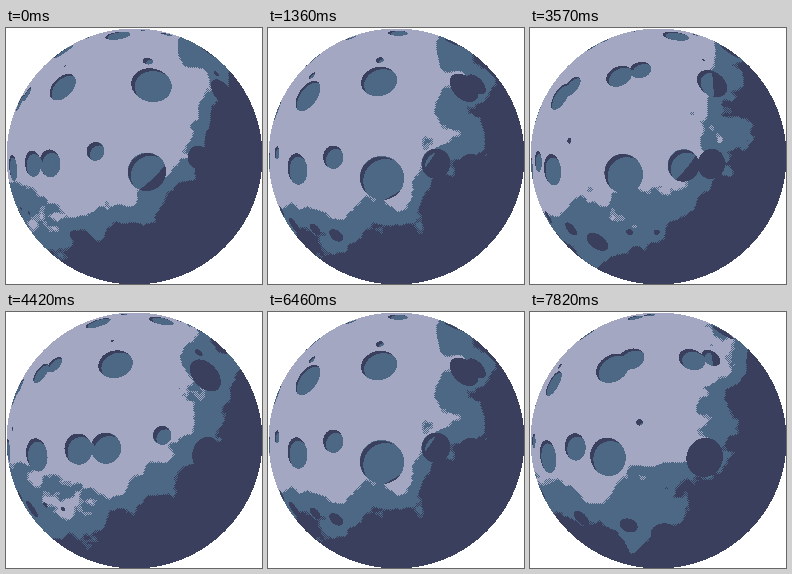
Recreate the animation shown at these times as an HTML page with a canvas. Size 256 by 256 pixels, loop 7.99 s.

```html
<!DOCTYPE html>
<html lang="en">
<head>
<meta charset="utf-8">
<title>Rotating moon</title>
<style>
  html, body { margin: 0; width: 100%; height: 100%; overflow: hidden; background: #fff; }
  canvas { display: block; width: 100%; height: 100%; image-rendering: pixelated; }
</style>
</head>
<body>
<canvas id="moon" width="256" height="256"></canvas>
<script>
const SIZE = 256;
const STEP_MS = 170;
const LOOP_STEPS = 47;
const TURN_STEPS = 30;
const SEED = 5.08;
const LIGHT = 0.25;
const GROUND_CELLS = 8;
const CRATER_CELLS = 5;
const MID_BORDER = 0.615;
const DARK_BORDER = 0.729;
const CRATER_BORDER = 0.465;
const DITHER = 2 / SIZE;
const SHADE_OFFSET = (LIGHT - 0.5) * 0.03;

// Little-endian ABGR pixels
const pack = (r, g, b) => (255 << 24 | b << 16 | g << 8 | r) >>> 0;
const PALE = pack(0xa3, 0xa7, 0xc2);
const MID = pack(0x4c, 0x68, 0x85);
const DARK = pack(0x3a, 0x3f, 0x5e);

const fract = v => v - Math.floor(v);
const ease = v => v * v * (3 - 2 * v);
const mix = (a, b, t) => a + (b - a) * t;

// Tiling lattice of seeded random values
function lattice(cells) {
  const values = Array.from({ length: cells * cells }, (_, n) => {
    const x = n % cells, y = Math.floor(n / cells);
    return fract(Math.sin(x * 12.9898 + y * 78.233) * 15.5453 * SEED);
  });
  const wrap = v => ((v % cells) + cells) % cells;
  return (x, y) => values[wrap(y) * cells + wrap(x)];
}
const groundRand = lattice(GROUND_CELLS);
const craterRand = lattice(CRATER_CELLS);

function noise(x, y) {
  const ix = Math.floor(x), iy = Math.floor(y);
  const tx = ease(x - ix), ty = ease(y - iy);
  const top = mix(groundRand(ix, iy), groundRand(ix + 1, iy), tx);
  const bottom = mix(groundRand(ix, iy + 1), groundRand(ix + 1, iy + 1), tx);
  return mix(top, bottom, ty);
}

function fbm(x, y) {
  let value = 0;
  for (let octave = 0, scale = 0.5; octave < 4; octave++, scale /= 2) {
    value += noise(x, y) * scale;
    x *= 2;
    y *= 2;
  }
  return value;
}

// 0 inside a crater, 1 outside
function circleNoise(x, y) {
  const row = Math.floor(y);
  x += row * 0.31;
  const column = Math.floor(x);
  const h = craterRand(column, row);
  const middle = 0.25 + h * 0.5;
  const distance = Math.hypot(x - column - middle, y - row - middle);
  const radius = h * 0.25;
  if (distance >= radius) return 1;
  return ease(Math.max(0, (distance - 0.9 * radius) / (0.1 * radius)));
}

function crater(u, v, turn) {
  const x = (u + turn) * CRATER_CELLS, y = v * CRATER_CELLS;
  return 1 - circleNoise(x + 11, y + 11) * circleNoise(x + 12, y + 12);
}

// Everything about a point on the disc that does not change with time
const points = [];
for (let row = 0; row < SIZE; row++) {
  for (let column = 0; column < SIZE; column++) {
    const x = column / SIZE, y = row / SIZE;
    const rim = Math.hypot(x - 0.5, y - 0.5);
    if (rim > 0.49999) continue;
    const bulge = Math.sqrt(1 - 4 * rim * rim) + 1;
    const warp = fbm(x, y);
    points.push({
      index: row * SIZE + column,
      rim,
      light: Math.hypot(x - LIGHT, y - LIGHT),
      groundX: x * GROUND_CELLS + warp,
      groundY: y * GROUND_CELLS + warp,
      u: (x - 0.5) / bulge + 0.5,
      v: (y - 0.5) / bulge + 0.5,
      dither: (row + column) % 2 === 0
    });
  }
}

function groundColor(p, turn) {
  const shade = p.light + 0.3 * fbm(p.groundX + turn * GROUND_CELLS, p.groundY);
  const passes = border => shade > border && !(p.dither && shade < border + DITHER);
  if (passes(DARK_BORDER)) return DARK;
  return passes(MID_BORDER) ? MID : PALE;
}

function pointColor(p, turn) {
  const depth = crater(p.u, p.v, turn);
  if (depth < 0.5) return groundColor(p, turn);
  if (p.light > CRATER_BORDER) return DARK;
  const lit = crater(p.u + SHADE_OFFSET, p.v + SHADE_OFFSET, turn);
  return lit < depth - (0.5 - p.rim) * 2 ? DARK : MID;
}

const context = document.getElementById("moon").getContext("2d");
const image = context.createImageData(SIZE, SIZE);
const pixels = new Uint32Array(image.data.buffer);
let shown = -1;

function draw(step) {
  const turn = (step % TURN_STEPS) / TURN_STEPS;
  for (const p of points) pixels[p.index] = pointColor(p, turn);
  context.putImageData(image, 0, 0);
  shown = step;
}

function tick(now) {
  const step = Math.floor(Math.max(0, now - start) / STEP_MS) % LOOP_STEPS;
  if (step !== shown) draw(step);
  requestAnimationFrame(tick);
}

const start = performance.now();
draw(0);
requestAnimationFrame(tick);
</script>
</body>
</html>
```
